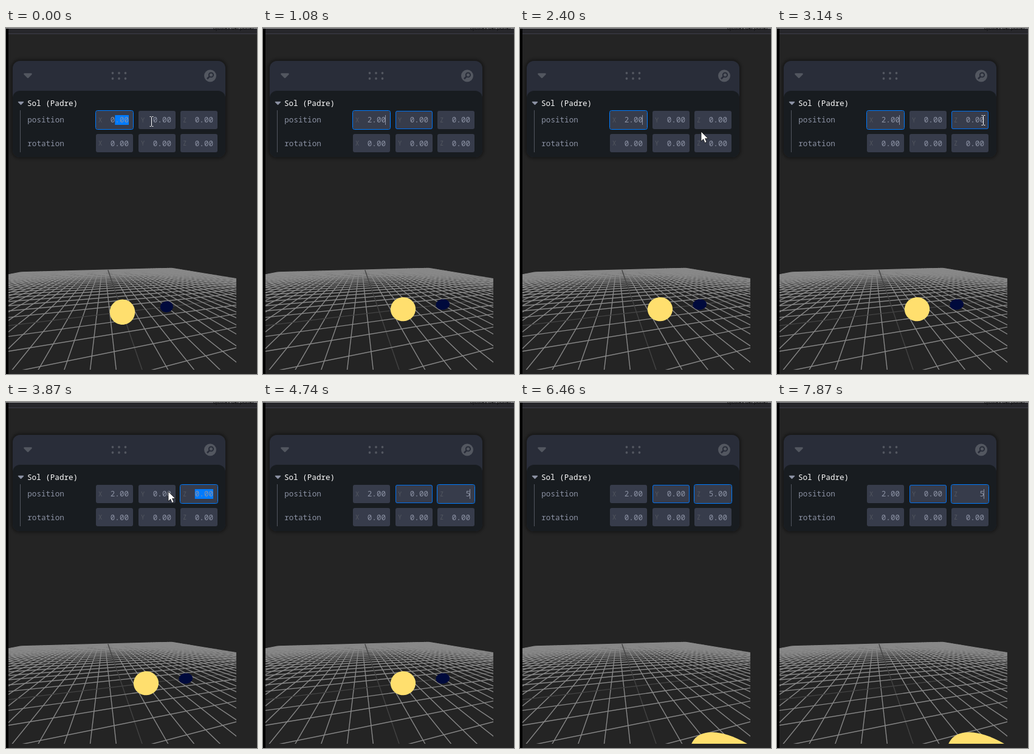
Write an HTML page that moves like this. It is 413 px wide and 568 px high and loops after 8 s.

```html
<!DOCTYPE html>
<html lang="es">
<head>
<meta charset="utf-8">
<title>Sol (Padre)</title>
<style>
  html, body { margin: 0; width: 100%; height: 100%; overflow: hidden; background: #242424; }
  svg { display: block; position: absolute; left: 0; top: 0; }
  .panel { position: absolute; left: 11px; top: 54px; width: 350px; height: 158px; border-radius: 12px;
    background: #292d39; box-shadow: 0 0 4px 3px #00000055; }
  .panel::after { content: ""; position: absolute; inset: 49px 0 0; border-radius: 12px; background: #181c20; }
  text { font: 12.6px "Noto Sans Mono", monospace; fill: #8c92a4; white-space: pre; }
  text.head { font-weight: 500; fill: #fefefe; }
  text.axis { font-size: 10.5px; fill: #535760; }
  text.num { text-anchor: end; }
  text.cut { font: italic 9px "Open Sans", sans-serif; fill: #111; }
</style>
</head>
<body>
<svg id="scene" width="413" height="568">
  <clipPath id="view"><rect x="4" y="371" width="375" height="190"/></clipPath>
  <rect width="413" height="10" fill="#27272b"/>
  <rect y="9" width="413" height="1" fill="#3d3d4a"/>
  <rect width="4" height="568"/>
  <rect width="413" height="1" fill="#a4a4a6"/>
  <text class="cut" x="341" y="3">ajustes del panel</text>
  <g clip-path="url(#view)">
    <g id="grid" stroke-width="1.4"></g>
    <path id="planet" fill="#000a3c"/>
    <path id="sun" fill="#ffdf6e"/>
  </g>
</svg>
<div class="panel"></div>
<svg id="ui" width="413" height="568">
  <g fill="#535760">
    <path d="M30.500 75.500h11l-5.500 5.500z" stroke="#535760" stroke-width="2.500" stroke-linejoin="round"/>
    <g id="dots"></g>
    <circle cx="336" cy="78.500" r="10"/>
    <rect x="23" y="135" width="1" height="69"/>
  </g>
  <g fill="none" stroke="#292d39" stroke-width="2">
    <circle cx="337.500" cy="77" r="3.600"/>
    <path d="M335 79.500l-4 4" stroke-width="2.600"/>
  </g>
  <path d="M20.500 121.500h8l-4 4z" fill="#8c92a4" stroke="#8c92a4" stroke-width="1.500" stroke-linejoin="round"/>
  <text class="head" x="35" y="128">Sol (Padre)</text>
  <text x="35.300" y="155">position</text>
  <text x="35.300" y="194">rotation</text>
  <g id="fields"></g>
  <rect id="hover" y="136.500" width="60" height="29" rx="2.500" fill="none" stroke="#006fee"/>
  <rect id="focus" y="135.500" width="62" height="31" rx="3" fill="none" stroke="#007bff"/>
  <rect id="caret" y="143" width="1" height="16" fill="#8c92a4"/>
  <path id="beam" d="M-2.500 -7.500h2l1 1 1-1h2M.5 -6.500v14M-2.500 8.500h2l1-1 1 1h2" fill="none" stroke="#fff"
    style="filter:drop-shadow(0 0 .6px #000)"/>
  <path id="arrow" d="M0 0v16l3.700-3.500 2.500 6 2.900-1.200-2.500-5.800h5z" fill="#fff" stroke="#111" stroke-width=".8"/>
</svg>
<script>
const $ = id => document.getElementById(id);
const add = (parent, tag, attrs, text = '') => {
  const el = document.createElementNS('http://www.w3.org/2000/svg', tag);
  for (const k in attrs) el.setAttribute(k, attrs[k]);
  el.textContent = text;
  return parent.appendChild(el);
};
const set = (el, k, v) => el.setAttribute(k, v);
const show = (el, on) => { el.style.display = on ? '' : 'none'; };

// Perspective camera orbiting the origin
const PITCH = 36.1 * Math.PI / 180, YAW = Math.atan(.202), DIST = 6.06;
const FOCAL = 95 / Math.tan(37.5 * Math.PI / 180);
const SP = Math.sin(PITCH), CP = Math.cos(PITCH), SY = Math.sin(YAW), CY = Math.cos(YAW);

const toCamera = (x, z) => {
  const ahead = x * SY - z * CY;
  return [x * CY + z * SY, ahead * SP, DIST + ahead * CP];
};
const project = ([x, y, d]) => [191.5 + FOCAL * x / d, 466.3 - FOCAL * y / d];

function gridLine(a, b, color) {
  const near = .1;
  let p = toCamera(...a), q = toCamera(...b);
  if (p[2] < near && q[2] < near) return;
  const cut = (from, to) => {
    const k = (near - from[2]) / (to[2] - from[2]);
    return from.map((v, i) => v + (to[i] - v) * k);
  };
  if (p[2] < near) p = cut(p, q);
  if (q[2] < near) q = cut(q, p);
  const [x1, y1] = project(p), [x2, y2] = project(q);
  add($('grid'), 'line', { x1, y1, x2, y2, stroke: color });
}
for (let i = -25; i <= 25; i++) {
  const color = i ? '#888' : '#444';
  gridLine([-25, i], [25, i], color);
  gridLine([i, -25], [i, 25], color);
}

// Outline of a sphere as seen by the camera
function ball(x, z, r) {
  const c = toCamera(x, z), len = Math.hypot(...c), n = c.map(v => v / len);
  const h = Math.hypot(n[0], n[2]);
  const u = [n[2] / h, 0, -n[0] / h];
  const v = [n[1] * u[2], n[2] * u[0] - n[0] * u[2], -n[1] * u[0]];
  const k = 1 - r * r / (len * len), rad = r * Math.sqrt(k);
  const pts = Array.from({ length: 64 }, (_, i) => {
    const a = i * Math.PI / 32, s = Math.sin(a) * rad, t = Math.cos(a) * rad;
    return project(c.map((m, j) => m * k + u[j] * t + v[j] * s)).map(n => n.toFixed(2));
  });
  return 'M' + pts.join('L') + 'Z';
}

// Panel
for (const x of [175.5, 186, 196.5]) for (const y of [74, 83]) add($('dots'), 'circle', { cx: x, cy: y, r: 1.9 });

const LEFT = { x: 148, y: 218, z: 287 }, CHAR = 7.56;
const fields = {};
for (const top of [136, 174]) for (const axis in LEFT) {
  const x = LEFT[axis], g = $('fields');
  add(g, 'rect', { x, y: top, width: 61, height: 30, rx: 3, fill: '#373c4b' });
  add(g, 'text', { class: 'axis', x: x + 4, y: top + 18.5 }, axis.toUpperCase());
  const sel = add(g, 'rect', { y: top + 7, height: 16, width: 0, fill: '#007bff' });
  const num = add(g, 'text', { class: 'num', x: x + 54, y: top + (top < 150 ? 19 : 20) }, '0.00');
  if (top < 150) fields[axis] = { sel, num };
}

// Each step changes part of the state: [ms, changes]
const start = { x: '0.00', z: '0.00', sel: 3, focus: 'x', hover: '', caret: 0, beam: [239, 153], arrow: 0, sun: [0, 0] };
const steps = [
  [120, { hover: 'y' }],
  [360, { x: '0', sel: 0, caret: 1, beam: 0 }],
  [480, { x: '' }],
  [600, { x: '2' }],
  [1080, { x: '2.00', sun: [2, 0] }],
  [1680, { caret: 0 }],
  [1920, { beam: [246, 153] }],
  [2040, { beam: [262, 156] }],
  [2160, { hover: '', beam: 0, arrow: [280, 167], caret: 1 }],
  [2280, { arrow: [290, 169] }],
  [2400, { arrow: [298, 170] }],
  [2640, { arrow: [302, 169], caret: 0 }],
  [2760, { hover: 'z', arrow: 0, beam: [312, 158] }],
  [2880, { beam: [326, 153] }],
  [3000, { beam: [339, 151] }],
  [3140, { caret: 1 }],
  [3260, { focus: 'z', hover: '', beam: [345, 151] }],
  [3380, { sel: 1, caret: 0, beam: [333, 151] }],
  [3510, { sel: 3, beam: [316, 151] }],
  [3630, { sel: 4, beam: [300, 150] }],
  [3750, { beam: 0, arrow: [284, 148] }],
  [3870, { arrow: [267, 147] }],
  [4620, { hover: 'y', arrow: 0, beam: [268, 152] }],
  [4740, { z: '5', sel: 0, caret: 1, beam: 0 }],
  [5220, { z: '5.00', sun: [2, 5] }],
  [5340, { caret: 0 }],
  [5960, { caret: 1 }],
  [6460, { caret: 0 }],
  [6960, { caret: 1 }],
  [7240, { z: '5.0' }],
  [7870, { z: '5' }]
];

function render(s) {
  for (const axis of ['x', 'z']) {
    const { sel, num } = fields[axis], w = axis === s.focus ? s.sel * CHAR : 0;
    num.textContent = s[axis];
    set(sel, 'x', LEFT[axis] + 54 - w);
    set(sel, 'width', w);
  }
  set($('focus'), 'x', LEFT[s.focus] - .5);
  set($('caret'), 'x', LEFT[s.focus] + 53);
  show($('caret'), s.caret);
  show($('hover'), s.hover);
  if (s.hover) set($('hover'), 'x', LEFT[s.hover] + .5);
  for (const id of ['beam', 'arrow']) {
    show($(id), s[id]);
    if (s[id]) set($(id), 'transform', `translate(${s[id]})`);
  }
  const [x, z] = s.sun;
  set($('sun'), 'd', ball(x, z, 1));
  set($('planet'), 'd', ball(x + 4, z, .49));
}

const t0 = performance.now();
let shown = -1;
function tick(now) {
  const t = Math.max(0, now - t0) % 8000;
  const count = steps.filter(([at]) => at <= t).length;
  if (count !== shown) {
    shown = count;
    render(Object.assign({}, start, ...steps.slice(0, count).map(([, change]) => change)));
  }
  requestAnimationFrame(tick);
}
tick(t0);
</script>
</body>
</html>
```
